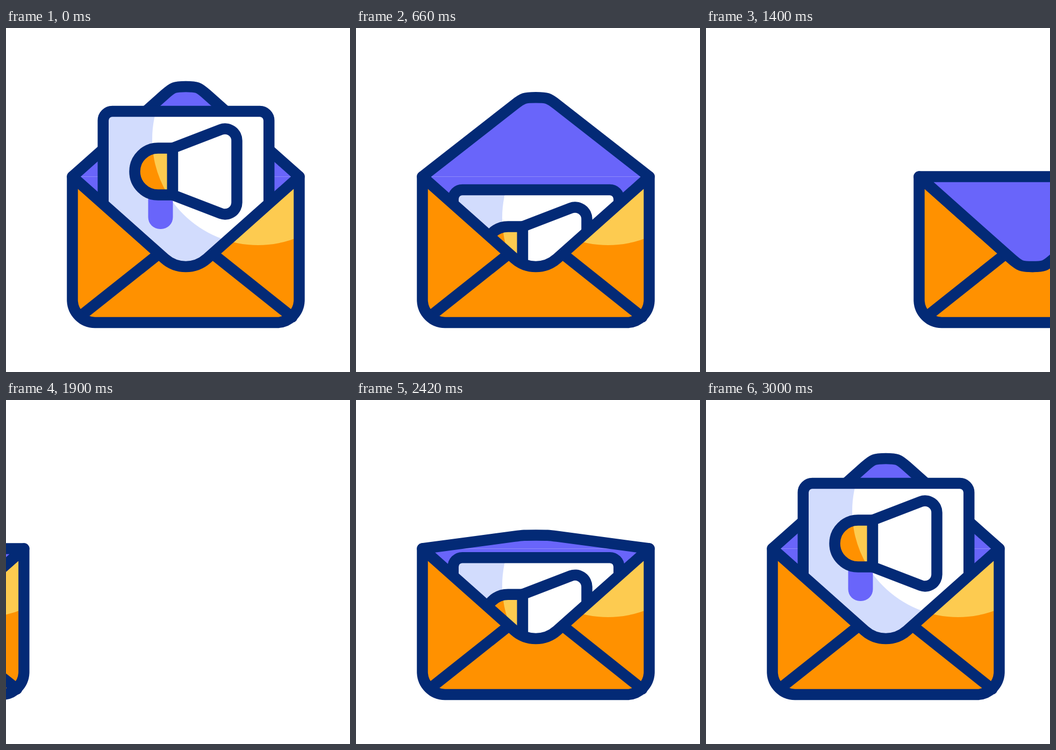
Write an HTML page that moves like this. It is 640 by 640 pixels and loops after 3.22 s.

```html
<!DOCTYPE html>
<html lang="en">
<head>
<meta charset="utf-8">
<title>Envelope</title>
<style>
  html, body { margin: 0; width: 100%; height: 100%; overflow: hidden; background: #fff; }
  svg { display: block; width: 100vw; height: 100vh; }
  .line { stroke: #032a76; stroke-width: 20.5; stroke-linecap: round; stroke-linejoin: round; }
  .purple { fill: #6965fa; }
  .orange { fill: #ff9100; }
  .yellow { fill: #fdcb50; }
  .white { fill: #fff; }
  .none { fill: none; }
</style>
</head>
<body>
<svg viewBox="0 0 640 640">
  <defs>
    <path id="pocket" d="M123.5 276.5V505.5A42 42.5 0 0 0 165.5 548H503.5A42 42.5 0 0 0 545.5 505.5V276.5L374 429A59.5 59.5 0 0 1 295 429Z"/>
    <path id="body" d="M310 223.5H283A43.5 43.5 0 0 0 283 310.5H310Z"/>
    <path id="sheet" d="M180.75 640V172A17 17 0 0 1 197.75 155H472.25A17 17 0 0 1 489.25 172V640"/>
    <circle id="shine" cx="469" cy="207" r="197"/>
    <clipPath id="pocketClip"><use href="#pocket"/></clipPath>
    <clipPath id="bodyClip"><use href="#body"/></clipPath>
    <clipPath id="sheetClip"><use href="#sheet"/></clipPath>
    <clipPath id="openingClip">
      <path d="M0 0H640V276.5H545.5L374 429A59.5 59.5 0 0 1 295 429L123.5 276.5H0Z"/>
    </clipPath>
  </defs>
  <g id="envelope">
    <path class="purple" d="M123.5 276.5H545.5L374 429H295Z"/>
    <path id="backFlap" class="line purple"/>
    <g clip-path="url(#openingClip)">
      <g id="paper">
        <use href="#sheet" fill="#d2dcfd"/>
        <use href="#shine" class="white" clip-path="url(#sheetClip)"/>
        <use href="#sheet" class="line none"/>
        <path class="purple" d="M264.5 300V352A22 22 0 0 0 286.5 374H288.5A22 22 0 0 0 310.5 352V300Z"/>
        <use href="#body" class="orange"/>
        <use href="#shine" class="yellow" clip-path="url(#bodyClip)"/>
        <use href="#body" class="line none"/>
        <path class="line white" d="M310 223.5L399.6 189A22 22 0 0 1 429.5 209.5V324.5A22 22 0 0 1 399.6 345L310 310.5Z"/>
      </g>
    </g>
    <use href="#pocket" class="orange"/>
    <use href="#shine" class="yellow" clip-path="url(#pocketClip)"/>
    <path class="line none" d="M283 421.3L138 536.5M386 421.3L532.3 537.8"/>
    <use href="#pocket" class="line none"/>
    <path id="frontFlap" class="line purple"/>
  </g>
</svg>
<script>
  const LOOP = 3220, STEP = 20, PAPER_DROP = 146;
  const [envelope, paper, backFlap, frontFlap] =
    ['envelope', 'paper', 'backFlap', 'frontFlap'].map(id => document.getElementById(id));

  // Smooth 0 to 1 between two times
  function ease(t, start, end) {
    const s = Math.min(1, Math.max(0, (t - start) / (end - start)));
    return s * s * (3 - 2 * s);
  }

  // lift: 1 is fully open, -1 fully closed
  function flapPath(lift) {
    const y = k => (276.5 - k * lift).toFixed(2);
    const k = 32.865;  // cubic handle length for the rounded tip
    const slope = 0.889;
    const reach = k * 0.64;
    const dx = reach * 0.7474, dy = dx * slope;
    return `M123.5 276.5L295 ${y(152.5)}` +
      `C${295 + dx} ${y(152.5 + dy)} ${334.5 - reach} ${y(167.5)} 334.5 ${y(167.5)}` +
      `S${374 - dx} ${y(152.5 + dy)} 374 ${y(152.5)}L545.5 276.5`;
  }

  function draw(t) {
    const drop = PAPER_DROP * (ease(t, 0, 600) - ease(t, 2325, 3000));
    const lift = 1 - 2 * (ease(t, 600, 1000) - ease(t, 2200, 2600));
    const x = t < 1700 ? 546 * ease(t, 1200, 1600) : -607 * (1 - ease(t, 1800, 2200));
    const open = lift > 0;

    envelope.setAttribute('transform', `translate(${x} 0)`);
    paper.setAttribute('transform', `translate(0 ${drop})`);
    backFlap.setAttribute('d', open ? flapPath(lift) : '');
    frontFlap.setAttribute('d', open ? '' : flapPath(lift) + 'Z');
  }

  let origin;
  function tick(now) {
    origin ??= now;
    draw(Math.floor(((now - origin) % LOOP) / STEP) * STEP);
    requestAnimationFrame(tick);
  }
  draw(0);
  requestAnimationFrame(tick);
</script>
</body>
</html>
```
